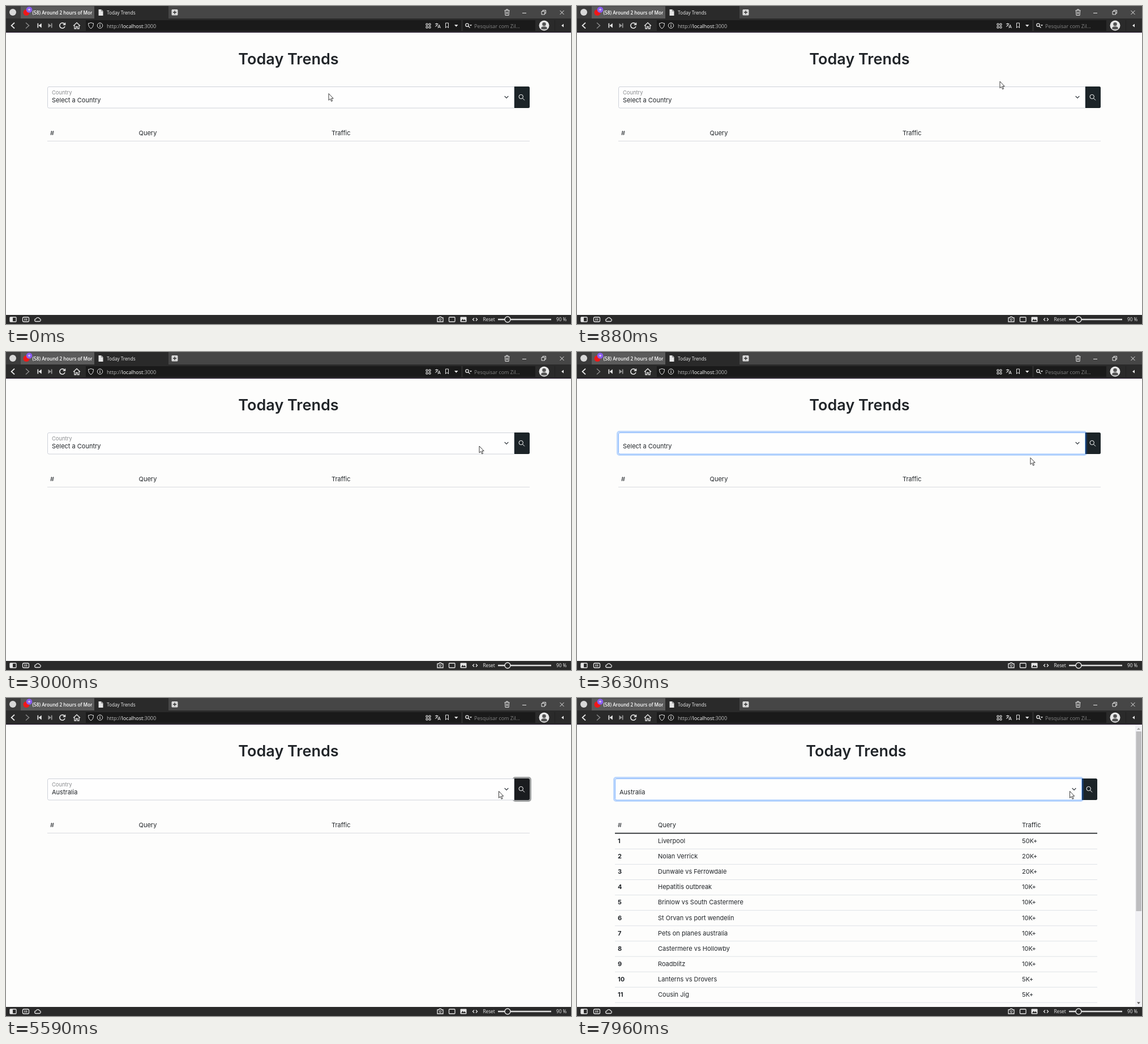
Write an HTML page that moves like this. It is 998x561 px and loops after 8000 ms.

```html
<!DOCTYPE html>
<html lang="en">
<head>
<meta charset="utf-8">
<title>Today Trends</title>
<style>
  html, body { margin: 0; width: 100%; height: 100%; overflow: hidden; background: #fdfdfc; }
  svg { display: block; width: 998px; height: 561px; }
  text { font: 11px Inter, sans-serif; fill: #212529; }
  .b { font-weight: 700; }
  .ui text { font: 8.2px "Open Sans", sans-serif; fill: #eee; }
  .ui text.url { font-size: 9px; fill: #bbb; }
  .line { fill: none; stroke: #e6e6e6; stroke-width: 1.3; }
  .fill { fill: #e6e6e6; }
  .thin { stroke-width: 1; }
</style>
</head>
<body>
<svg viewBox="0 0 998 561">
  <rect width="998" height="561" fill="#fdfdfc"/>

  <g id="page">
    <text x="499" y="103" text-anchor="middle" style="font-size:27px;font-weight:600">Today Trends</text>
    <path d="M897 142h25.500q2.500 0 2.500 2.500v33q0 2.500-2.500 2.500H897z" id="button"/>
    <g fill="none" stroke="#fff"><circle cx="909.700" cy="160" r="3.700"/><path d="M912.500 162.800l3.500 3.500"/></g>
    <rect id="buttonRing" x="896" y="140.500" width="30.500" height="41" rx="3.500" fill="none" stroke="#424649" stroke-opacity=".5" stroke-width="3"/>
    <rect id="selectRing" x="71.500" y="140.500" width="828" height="41" rx="3.500" fill="none" stroke="#0d6efd" stroke-opacity=".27" stroke-width="3"/>
    <path id="select" d="M897.500 142.500H76q-2.500 0-2.500 2.500v32.500q0 2.500 2.500 2.500h821.500z" fill="#fefefe"/>
    <path d="M880.700 159l3.300 3.300 3.300-3.300" fill="none" stroke="#343a40" stroke-width="1.200"/>
    <text id="label" x="81" y="156.300" style="font-size:9.400px;fill:#8b8d90">Country</text>
    <text id="value" x="81" y="170.300"></text>
  </g>

  <g id="empty">
    <g class="b"><text x="78" y="228">#</text><text x="234.500" y="228">Query</text><text x="575" y="228">Traffic</text></g>
    <path d="M73 238.300H925" stroke="#dee0e4" stroke-width="1.200"/>
  </g>

  <g id="results">
    <g class="b"><text x="72" y="228">#</text><text x="143" y="228">Query</text><text x="786" y="228">Traffic</text></g>
    <g id="rows"></g>
    <path d="M67 238.600H919" stroke="#212529" stroke-width="1.600"/>
    <rect x="986" y="47" width="12" height="498" fill="#f1f1f4"/>
    <rect x="987.500" y="59" width="9.500" height="317" fill="#bdbdbf"/>
    <path d="M989 56l3-3.500 3 3.500z" fill="#a5a5a5"/><path d="M989 536.500l3 3.500 3-3.500z" fill="#555"/>
  </g>

  <g class="ui">
    <path d="M0 0h998v23H0z" fill="#464646"/>
    <path d="M0 22h998v25H0zM156 0h131v23H156zM0 545h998v16H0z" fill="#2a2a2a"/>
    <path d="M0 0h26v22H0z" fill="#3c3c3c"/>
    <path d="M26 1h130v21H26z" fill="#5b5b5b"/>
    <path d="M141 25h663v19H141zM807 25h128v19H807z" fill="#1a1a1a"/>
    <path d="M0 46h998v1H0z" fill="#2b1f35"/>

    <!-- tabs -->
    <circle cx="12" cy="11" r="6" fill="#d8d8d8"/>
    <circle cx="36" cy="11.500" r="5.500" fill="#f01818"/>
    <circle cx="41" cy="6.500" r="5.300" fill="#8a5cf0"/>
    <path d="M38.800 6.500h4.400M41 4.300v4.400" class="line thin"/>
    <clipPath id="tabClip"><path d="M46 0h106v22H46z"/></clipPath>
    <text x="46.500" y="14.500" clip-path="url(#tabClip)" style="font-weight:600;fill:#fff">(58) Around 2 hours of Morel</text>
    <path d="M163.500 6h5l3 3v8h-8z" class="fill"/><path d="M168.500 6v3h3" class="line thin" style="stroke:#777"/>
    <text x="178" y="14.500">Today Trends</text>
    <rect x="292.500" y="6" width="11" height="10.500" rx="1.500" fill="#d8d8d8"/>
    <path d="M295 11.200h6M298 8.200v6" stroke="#333" stroke-width="1.400"/>
    <path d="M880.500 7.800h9M883.500 7.500v-1.500h3v1.500M881.500 8l.5 8.500h6l.5-8.500M884 10v4.500M886 10v4.500M912 12.500h7M946 9.500h5.500v5.500H946zM948 9v-1.500h5.500v5.500h-1.500M978.500 8l7 7M985.500 8l-7 7" class="line thin"/>

    <!-- address bar -->
    <path d="M15 29.500l-5.500 5 5.500 5" class="line" style="stroke-width:1.700"/>
    <path d="M35 29.500l5.500 5-5.500 5" class="line" style="stroke:#888;stroke-width:1.500"/>
    <path d="M55.500 30.500h1.700v8h-1.700zM62.800 30.500v8l-5.300-4z" class="fill"/>
    <path d="M81.500 30.500h-1.700v8h1.700zM74.500 30.500v8l5.300-4z" fill="#999"/>
    <path d="M103.500 32a4.700 4.700 0 1 0 .5 4M104.500 29.500v3.500h-3.700" class="line" style="stroke-width:1.600"/>
    <path d="M119 35l6-5.500 6 5.500M121 34v6h2.700v-3.500h2.600v3.500h2.700v-6" class="line"/>
    <path d="M145.500 30.500q3 0 4.500-1.200 1.500 1.200 4.500 1.200 0 7-4.500 9.200-4.500-2.200-4.500-9.200z" class="line thin"/>
    <circle cx="166" cy="34.500" r="4.700" class="line thin"/><path d="M166 34v3M166 31.700v1.200" class="line"/>
    <text class="url" x="178" y="38.500">http://<tspan fill="#fff">localhost</tspan>:3000</text>
    <path d="M742 31h3v3h-3zM747 31h3v3h-3zM742 36h3v3h-3zM747 36h3v3h-3z" class="line thin"/>
    <path d="M758 31.500h5.500M760.700 30v1.500M762.500 31.500q-1 3.500-4.500 5M759.500 33l3 3M763 39l2.200-6 2.200 6M763.800 37.300h2.800" class="line thin"/>
    <path d="M776.500 30h5v8.500l-2.500-2.300-2.500 2.300z" class="line thin"/>
    <path d="M792 33h6.500l-3.200 3.800zM819 33h4l-2 2.500z" class="fill"/>
    <circle cx="814.500" cy="33.500" r="2.700" class="line"/><path d="M816.500 35.500l3 3" class="line"/>
    <text class="url" x="827" y="38.500" style="fill:#858585">Pesquisar com Zil...</text>
    <circle cx="950.500" cy="34.500" r="9" fill="#e8e8e8"/>
    <path d="M945 40q0-4 5.500-4t5.500 4q-5.500 3-11 0z" fill="#555"/><circle cx="950.500" cy="32" r="3.300" fill="#555"/>
    <path d="M969.500 25v19" stroke="#222"/><path d="M985 31.500v6l-4-3z" class="fill"/>

    <!-- status bar -->
    <rect x="7" y="549" width="11" height="8" rx="1" class="line"/><path d="M7 549h5v8H7z" class="fill"/>
    <rect x="29.500" y="549" width="11" height="8" rx="2" class="line"/><path d="M33.500 551v4M36.500 551v4" class="line"/>
    <path d="M53 556.500a2.300 2.300 0 0 1 0-4.600 3.400 3.400 0 0 1 6.300-.3 2.500 2.500 0 0 1 0 4.900z" class="line"/>
    <path d="M762 550h2.500l1-1.500h3l1 1.500h2.500v7H762z" class="line"/><circle cx="767" cy="553.300" r="1.700" class="line thin"/>
    <rect x="782.500" y="549" width="10.500" height="8" rx="1" class="line"/>
    <rect x="802.500" y="548.500" width="11" height="9" rx="1" class="fill"/><path d="M804 556l2.500-4 2 2.500 1.500-2 2.500 3.500z" fill="#2a2a2a"/>
    <path d="M827 550.500l-2.500 2.500 2.500 2.500M830 550.500l2.500 2.500-2.500 2.500" class="line"/>
    <text x="842.500" y="556">Reset</text>
    <path d="M869 553h94" stroke="#ddd" stroke-width="2.500"/>
    <circle cx="886" cy="553" r="5" fill="#2a2a2a" stroke="#eee" stroke-width="1.300"/>
    <text x="972" y="556">90 %</text>
  </g>

  <g id="cursor" fill="#fff" stroke="#222" stroke-width=".9" stroke-linejoin="round">
    <path id="arrow" d="M0 0v11.800l2.700-2.500 2 4.400 1.900-.8-2-4.300h3.600z"/>
    <path id="hand" d="M-.2.500q1.300-1 2.100.4v4.300q1.200-.7 1.800.4 1.300-.6 1.800.5 1.500-.5 1.800.8v4.200l-1.300 2.400v2.200H.2v-2l-3.600-4.700q-.2-1.600 1.300-1.300l1.600 1.600V1z"/>
  </g>
</svg>

<script>
const LOOP = 8000;
const FOCUS = 3300, CHOOSE = 4340, SUBMIT = 5090, LOADED = 6960, REFOCUS = 7560;

const queries = [
  ["Liverpool", 50], ["Nolan Verrick", 20], ["Dunwale vs Ferrowdale", 20], ["Hepatitis outbreak", 10],
  ["Brinlow vs South Castermere", 10], ["St Orvan vs port wendelin", 10], ["Pets on planes australia", 10],
  ["Castermere vs Hollowby", 10], ["Roadblitz", 10], ["Lanterns vs Drovers", 5], ["Cousin Jig", 5]
];

// Pointer path: time, x, y
const path = [
  [0, 570, 154.500], [400, 570, 154.500], [600, 690, 140], [840, 747, 133], [880, 747, 133], [960, 747, 136],
  [2010, 747, 136], [2050, 765.500, 139.500], [2250, 831, 152], [2340, 824, 154], [2800, 824, 154], [3000, 836, 166],
  [3400, 836, 166], [3630, 801, 186.500], [4050, 786, 207], [4380, 786, 207], [4600, 870, 178], [4800, 912.500, 166],
  [5250, 912.500, 166], [5450, 885, 163], [5590, 870.500, 164.500], [LOOP, 870.500, 164.500]
];

const $ = id => document.getElementById(id);
const show = (id, on) => $(id).style.display = on ? "" : "none";
const ramp = (t, start, length = 150) => {
  const p = Math.min(1, Math.max(0, (t - start) / length));
  return p * p * (3 - 2 * p);
};
const mix = (a, b, p) => `rgb(${a.map((v, i) => v + (b[i] - v) * p)})`;

$("rows").innerHTML = queries.map(([query, traffic], i) => {
  const y = 256 + 27.1 * i;
  return `<text class="b" x="72" y="${y}">${i + 1}</text><text x="143" y="${y}">${query}</text>
    <text x="786" y="${y}">${traffic}K+</text><path d="M67 ${y + 10.3}H919" stroke="#dee2e6"/>`;
}).join("");

function pointerAt(t) {
  const i = path.findIndex(key => key[0] > t);
  const [t0, x0, y0] = path[i - 1], [t1, x1, y1] = path[i];
  const p = (t - t0) / (t1 - t0);
  return [x0 + (x1 - x0) * p, y0 + (y1 - y0) * p];
}

function draw(t) {
  const [x, y] = pointerAt(t);
  const overButton = t < LOADED && x > 897 && x < 925 && y > 142 && y < 180;
  const selectFocus = ramp(t, FOCUS) - ramp(t, SUBMIT) + ramp(t, REFOCUS);
  const buttonFocus = ramp(t, SUBMIT) - ramp(t, REFOCUS);
  const loaded = t >= LOADED;

  $("page").setAttribute("transform", `translate(${loaded ? -6 : 0})`);
  show("empty", !loaded);
  show("results", loaded);
  $("value").textContent = t < CHOOSE ? "Select a Country" : "Australia";
  $("label").style.opacity = 1 - selectFocus;
  $("selectRing").style.opacity = selectFocus;
  $("buttonRing").style.opacity = buttonFocus;
  $("select").style.stroke = mix([206, 210, 218], [134, 183, 254], selectFocus);
  $("button").style.fill = mix([28, 36, 40], [26, 28, 31], overButton ? 1 : buttonFocus);

  $("cursor").setAttribute("transform", `translate(${x} ${y})`);
  show("arrow", !overButton);
  show("hand", overButton);
}

const start = performance.now();
function tick() {
  draw((performance.now() - start) % LOOP);
  requestAnimationFrame(tick);
}
tick();
</script>
</body>
</html>
```
